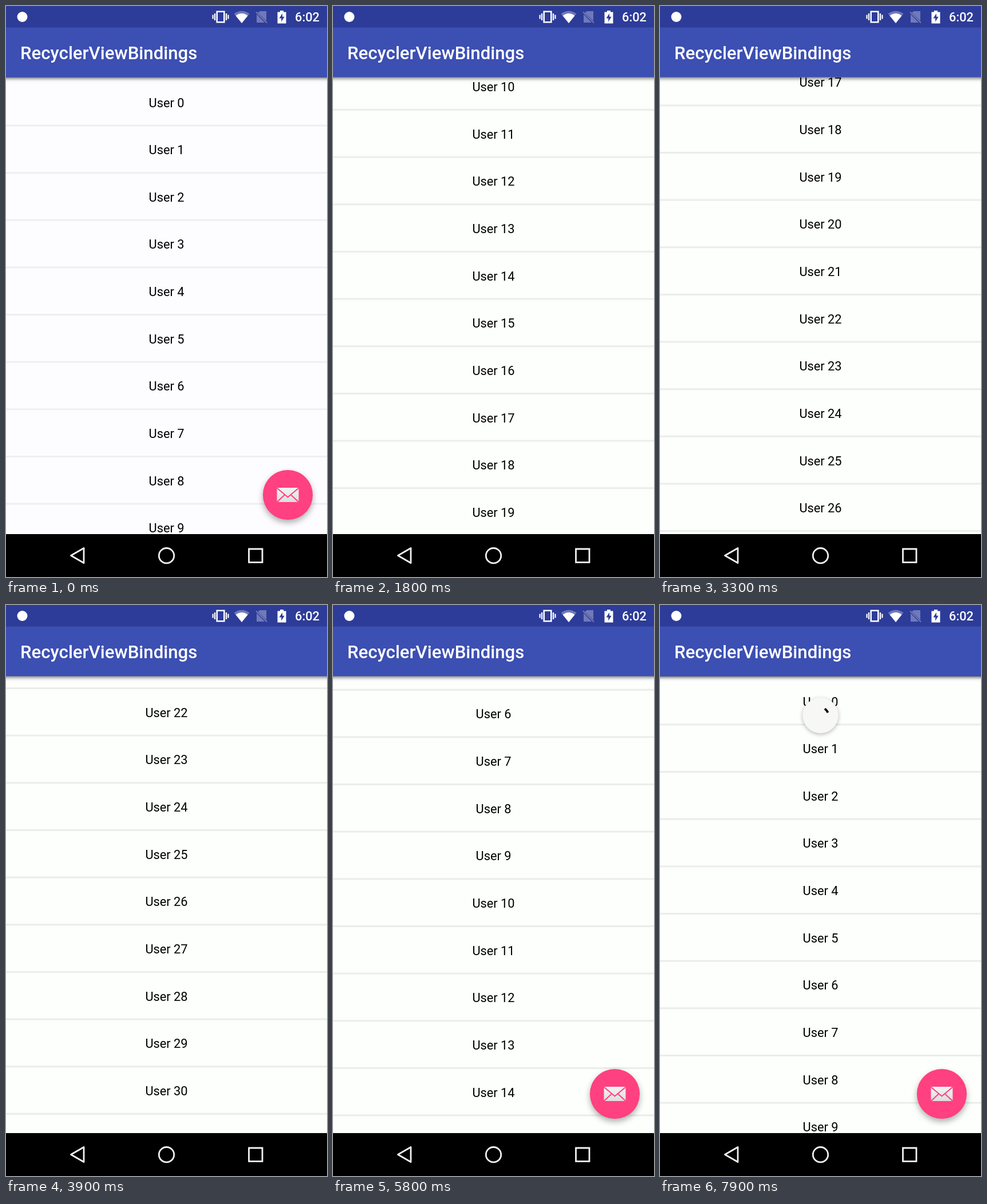
Recreate the animation shown at these times as an HTML page with a canvas. Size 561 by 998 pixels, loop 8 s.

```html
<!DOCTYPE html>
<html lang="en">
<head>
<meta charset="utf-8">
<title>RecyclerViewBindings</title>
<style>
  html, body { margin: 0; width: 100%; height: 100%; overflow: hidden; background: #000; }
  canvas { display: block; }
</style>
</head>
<body>
<canvas id="stage" width="561" height="998"></canvas>
<script>
const ctx = document.getElementById('stage').getContext('2d');
const W = 561, LOOP = 8000, STEP = 100;
const BAR_BOTTOM = 124.5, NAV_TOP = 923;
const PITCH = 82.65, ROW_HEIGHT = 79.6, FIRST_ROW = 127.8;
const PAGE_LOADED = 2800;

// [time, scroll offset]
const scrollKeys = [
  [0, 0], [900, 0], [1100, 340], [1400, 810], [1500, 854], [1800, 854],
  [2100, 967.5], [2800, 967.5], [3300, 1440.2], [3700, 1750], [4200, 1833.3],
  [4900, 1833.3], [5200, 1480], [5800, 474], [6200, 0], [8000, 0]
];

const clamp = v => Math.max(0, Math.min(1, v));
const progress = (t, start, end) => clamp((t - start) / (end - start));
const mix = (a, b, p) => a + (b - a) * p;
const easeOut = p => 1 - (1 - p) ** 2;
const smooth = p => p * p * (3 - 2 * p);

// Monotone cubic interpolation: smooth between keys, flat on plateaus.
function sample(keys, t) {
  const slope = i => (keys[i + 1][1] - keys[i][1]) / (keys[i + 1][0] - keys[i][0]);
  const tangent = i => {
    if (i === 0 || i === keys.length - 1) return 0;
    const a = slope(i - 1), b = slope(i);
    return a * b > 0 ? 2 * a * b / (a + b) : 0;
  };
  let i = 0;
  while (i < keys.length - 2 && t >= keys[i + 1][0]) i++;
  const [t0, v0] = keys[i], [t1, v1] = keys[i + 1];
  const d = t1 - t0, p = (t - t0) / d;
  return mix(v0, v1, smooth(p)) + d * p * (1 - p) * ((1 - p) * tangent(i) - p * tangent(i + 1));
}

function rect(color, x, y, w, h) {
  ctx.fillStyle = color;
  ctx.fillRect(x, y, w, h);
}

function text(value, x, y, font, color, align = 'left') {
  ctx.font = font + ' Roboto, sans-serif';
  ctx.textAlign = align;
  ctx.fillStyle = color;
  ctx.fillText(value, x, y);
}

function fillPath(d, color) {
  ctx.fillStyle = color;
  ctx.fill(new Path2D(d));
}

function strokePath(d, color, width) {
  ctx.strokeStyle = color;
  ctx.lineWidth = width;
  ctx.stroke(new Path2D(d));
}

function disc(x, y, r, color) {
  ctx.beginPath();
  ctx.arc(x, y, r, 0, 2 * Math.PI);
  ctx.fillStyle = color;
  ctx.fill();
}

function withShadow(color, blur, offset, draw) {
  ctx.save();
  ctx.shadowColor = color;
  ctx.shadowBlur = blur;
  ctx.shadowOffsetY = offset;
  draw();
  ctx.restore();
}

function drawList(t) {
  const scroll = sample(scrollKeys, t);
  const early = t < 1800;
  const count = t < PAGE_LOADED ? 20 : 40;
  rect(early ? '#efeff2' : '#ebedea', 0, BAR_BOTTOM, W, NAV_TOP - BAR_BOTTOM);
  for (let i = 0; i < count; i++) {
    const y = FIRST_ROW + i * PITCH - scroll;
    if (y < BAR_BOTTOM - PITCH || y > NAV_TOP) continue;
    rect(early ? '#fdfcfe' : '#fdfffc', 0, y, W, ROW_HEIGHT);
    text('User ' + i, W / 2, y + 48.7, '21.8px', '#000', 'center');
  }
}

function drawFab(t) {
  const size = t < 3000 ? 1 - progress(t, 1000, 1200) : easeOut(progress(t, 5000, 5200));
  if (size <= 0) return;
  ctx.save();
  ctx.globalAlpha = size;
  ctx.translate(492.5, 854.5);
  ctx.scale(size, size);
  withShadow('rgba(0,0,0,.32)', 11, 5, () => disc(0, 0, 43.6, '#ff4081'));
  const paper = ctx.createLinearGradient(0, -12, 0, 12);
  paper.addColorStop(0, '#f3f3f3');
  paper.addColorStop(1, '#dedede');
  rect(paper, -19, -12.5, 38, 25);
  strokePath('M-19-12L0 4L19-12M-19 12.5L-5.5 0M19 12.5L5.5 0', '#ff4081', 2);
  ctx.restore();
}

function drawRefresh(t) {
  if (t < 6500) return;
  const pull = easeOut(progress(t, 6500, 7100));
  const finish = progress(t, 7200, 7900);
  const dragged = mix(BAR_BOTTOM - 31, 238, pull);
  const y = mix(dragged, 193, easeOut(progress(t, 7100, 7300)));
  const dragging = t < 7200;
  const sweep = mix(.8 * 2 * Math.PI * pull, .36, smooth(finish));
  const head = mix(-1.85, -.5, finish) - (1 - pull) * 2;

  ctx.save();
  ctx.translate(W / 2, y);
  withShadow('rgba(0,0,0,.28)', 7, 2, () => disc(0, 0, 31.2, '#f7f7f6'));
  ctx.globalAlpha = dragging && pull < .75 ? .3 : 1;
  ctx.rotate(head);
  ctx.beginPath();
  ctx.arc(0, 0, 13.7, -sweep, 0);
  ctx.lineCap = 'square';
  ctx.lineWidth = 3.9;
  ctx.strokeStyle = '#000';
  ctx.stroke();
  if (dragging) fillPath('M6 0H21.5L13.7 8Z', '#000');
  ctx.restore();
}

function drawStatusIcons() {
  const white = '#fff', dim = 'rgba(255,255,255,.32)';
  disc(28.5, 19, 9, white);

  strokePath('M368.7 9.7H381.3V28.3H368.7Z', white, 2.6);
  strokePath('M365 13V25M385 13V25M361.6 15.5V22.5M388.4 15.5V22.5', white, 2.2);

  fillPath('M412 30L398.5 13.5Q412 4 425.5 13.5Z', dim);
  fillPath('M412 30L401.5 17Q412 9 422.5 17Z', white);

  fillPath('M444 9H455V26L440 11.5ZM438 14.5L452 29H438Z', dim);
  strokePath('M437 10.5L456 29.5', dim, 2);

  fillPath('M479 8H485V10.5H489.5V30.5H474.5V10.5H479Z', white);
  fillPath('M483 13L477.5 21.5H481.2V27.5L486.7 18.8H483Z', '#2d3c98');
  text('6:02', 548, 27, '500 21.8px', white, 'right');
}

function drawBars() {
  withShadow('rgba(0,0,0,.5)', 6, 2, () => rect('#3c4fb2', -10, 0, W + 20, BAR_BOTTOM));
  rect('#2d3c98', 0, 0, W, 37.5);
  text('RecyclerViewBindings', 25, 93, '500 31.2px', '#fff');
  drawStatusIcons();

  rect('#000', 0, NAV_TOP, W, 998 - NAV_TOP);
  ctx.lineJoin = 'round';
  strokePath('M136 947.5V973.5L113.5 960.5Z', '#f2f2f2', 2.8);
  ctx.lineJoin = 'miter';
  strokePath('M424.5 949H448V972.3H424.5Z', '#f2f2f2', 2.8);
  ctx.beginPath();
  ctx.arc(280.5, 960.7, 13.2, 0, 2 * Math.PI);
  ctx.stroke();
}

const startTime = performance.now();

function frame() {
  const elapsed = (performance.now() - startTime) % LOOP;
  const t = Math.floor(elapsed / STEP) * STEP;
  drawList(t);
  drawFab(t);
  drawRefresh(t);
  drawBars();
  requestAnimationFrame(frame);
}
frame();
</script>
</body>
</html>
```
